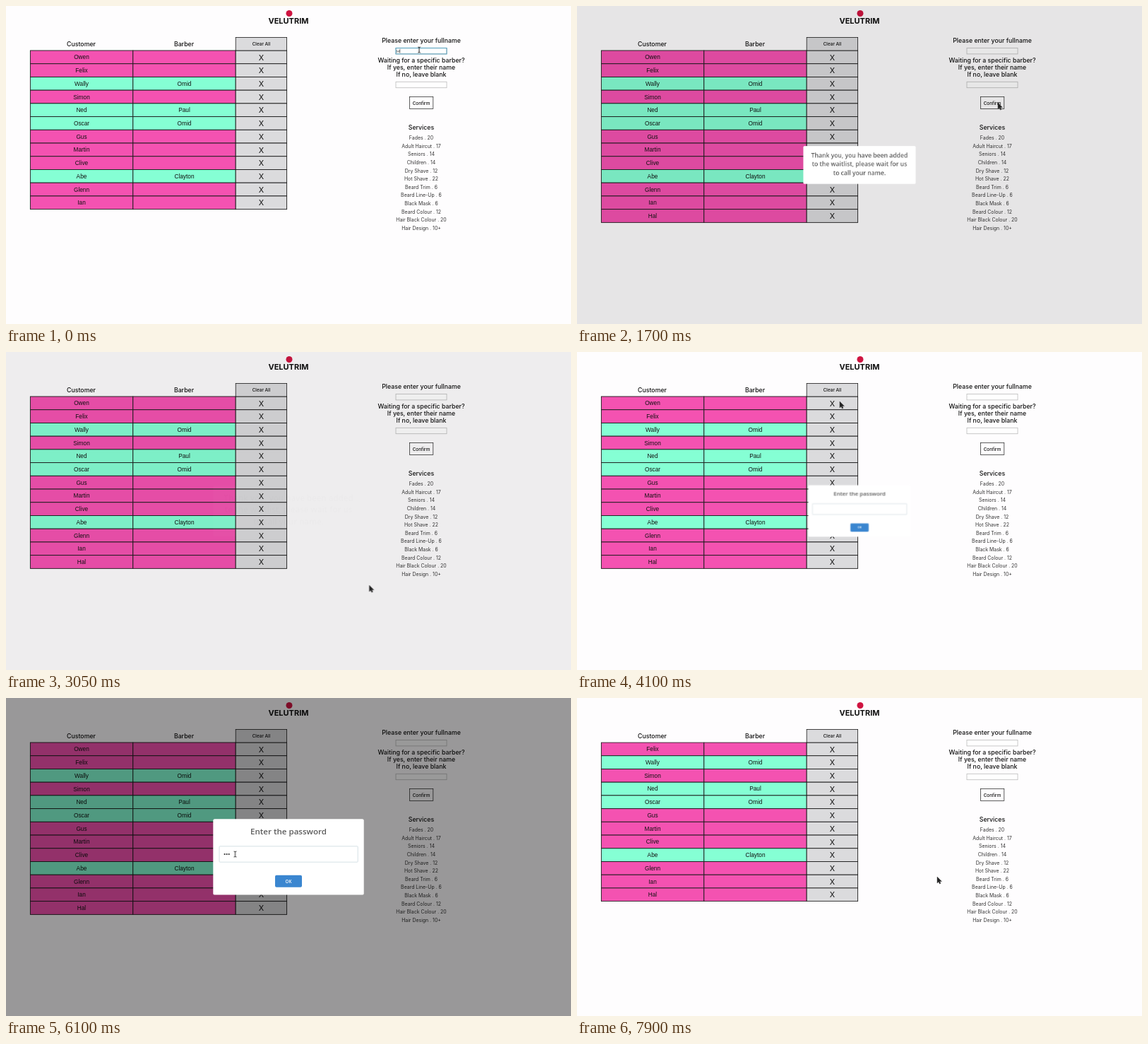
These frames come from a looping animation (800 px wide and 450 px high, 8000 ms). An HTML page:

```html
<!DOCTYPE html>
<html lang="en">
<head>
<meta charset="utf-8">
<title>Barber waitlist</title>
<style>
html, body { margin: 0; width: 100%; height: 100%; overflow: hidden; background: #fefdfe; }
svg { display: block; width: 100%; height: 100%; }
text { font-family: Inter, sans-serif; text-anchor: middle; fill: #111; }
.head { font-size: 8.75px; font-weight: 500; }
.small { font-size: 6.4px; font-weight: 500; }
.list { font-size: 6.95px; fill: #333; }
.name { font: 8.3px "Liberation Sans", Arial, sans-serif; }
.cross { font-size: 10.8px; }
.field { fill: #fff; stroke: #bbb; stroke-width: .8; }
.typed text { font: 6px "Liberation Sans", Arial, sans-serif; text-anchor: start; fill: #333; }
.modal { transform-origin: 400px 225px; }
.modal text { font: 600 11.55px "Open Sans", "Noto Sans", sans-serif; fill: #5c5c5c; }
.modal .ok { font-size: 6.2px; fill: #fff; }

/* 1% = 80 ms */
svg [class*="a-"] { animation: 8s infinite linear; }
svg .a-added { animation-name: added; animation-timing-function: step-end; }
svg .a-removed { animation-name: removed; animation-timing-function: step-end; }
svg .a-shift { animation-name: shift; animation-timing-function: step-end; }
svg .a-type1 { animation-name: type1; animation-timing-function: step-end; }
svg .a-type2 { animation-name: type2; animation-timing-function: step-end; }
svg .a-type3 { animation-name: type3; animation-timing-function: step-end; }
svg .a-focus { animation-name: focus; animation-timing-function: step-end; }
svg .a-dots { animation-name: dots; animation-timing-function: step-end; }
svg .a-hover { animation-name: hover; animation-timing-function: step-end; }
svg .a-beam { animation-name: beam; animation-timing-function: step-end; }
svg .a-arrow { animation-name: arrow; animation-timing-function: step-end; }
svg .a-shade { animation-name: shade; animation-timing-function: ease; }
svg .a-thanks { animation-name: thanks; animation-timing-function: ease; }
svg .a-password { animation-name: password; animation-timing-function: ease; }
svg .a-pointer { animation-name: pointer; animation-timing-function: ease-in-out; }

@keyframes added { 0% { opacity: 0 } 20.6%, 100% { opacity: 1 } }
@keyframes removed { 0% { opacity: 1 } 94.3%, 100% { opacity: 0 } }
@keyframes shift { 0% { transform: none } 94.3%, 100% { transform: translateY(-18.72px) } }
@keyframes type1 { 0% { opacity: 1 } 2.5%, 100% { opacity: 0 } }
@keyframes type2 { 0% { opacity: 0 } 2.5% { opacity: 1 } 5%, 100% { opacity: 0 } }
@keyframes type3 { 0% { opacity: 0 } 5% { opacity: 1 } 20.6%, 100% { opacity: 0 } }
@keyframes focus { 0% { opacity: 1 } 20%, 100% { opacity: 0 } }
@keyframes dots { 0%, 100% { opacity: 0 } 75% { opacity: 1 } }
@keyframes hover { 0% { opacity: 0 } 90.3%, 100% { opacity: 1 } }
@keyframes beam { 0% { opacity: 1 } 14.4% { opacity: 0 } 67.6% { opacity: 1 } 85.2%, 100% { opacity: 0 } }
@keyframes arrow { 0% { opacity: 0 } 14.4% { opacity: 1 } 67.6% { opacity: 0 } 85.2%, 100% { opacity: 1 } }
@keyframes shade {
  0%, 20.62% { opacity: 0 } 24.37%, 36.1% { opacity: .4 } 39.85%, 51.25% { opacity: 0 }
  55%, 93.6% { opacity: .4 } 97.3%, 100% { opacity: 0 }
}
@keyframes thanks {
  0%, 20.8% { opacity: 0; transform: scale(.5) }
  20.81% { opacity: 1; transform: scale(.5) }
  22.5% { transform: scale(1.05) }
  23.81% { transform: scale(.95) }
  24.56% { transform: none }
  36.1% { opacity: 1; transform: none }
  38.6%, 100% { opacity: 0; transform: none }
}
@keyframes password {
  0%, 50.89% { opacity: 0; transform: scale(.5) }
  50.9% { opacity: 1; transform: scale(.5) }
  52.59% { transform: scale(1.05) }
  53.9% { transform: scale(.95) }
  54.65% { transform: none }
  93.6% { opacity: 1; transform: none }
  96.1%, 100% { opacity: 0; transform: none }
}
@keyframes pointer {
  0%, 12.5% { transform: translate(585px, 62px) }
  18.8%, 23.1% { transform: translate(596px, 137px) }
  32.5%, 37.5% { transform: translate(516px, 333px) }
  46%, 53% { transform: translate(372px, 70px) }
  58.7%, 61.2% { transform: translate(484px, 99px) }
  68.7%, 83.1% { transform: translate(324.5px, 221px) }
  90.8%, 93.6% { transform: translate(405px, 257px) }
  98.6%, 100% { transform: translate(510px, 253px) }
}
</style>
</head>
<body>
<svg viewBox="0 0 800 450">
  <rect width="800" height="450" fill="#fefdfe"/>
  <circle cx="401" cy="10.5" r="4.5" fill="#cf1440"/>
  <text x="400" y="24.6" font-size="11" font-weight="700">VELUTRIM</text>

  <g id="table"></g>
  <g id="form"></g>

  <g class="typed">
    <rect class="a-focus" x="552" y="59.5" width="72" height="8.4" fill="none" stroke="#4f9dbb"/>
    <g class="a-type1"><text x="553" y="65.8">H</text><path d="M557.9 60.8v5.8" stroke="#222" stroke-width=".6"/></g>
    <g class="a-type2"><text x="553" y="65.8">Ha</text><path d="M561.2 60.8v5.8" stroke="#222" stroke-width=".6"/></g>
    <g class="a-type3"><text x="553" y="65.8">Hal</text><path d="M562.6 60.8v5.8" stroke="#222" stroke-width=".6"/></g>
  </g>

  <rect class="a-shade" width="800" height="450"/>

  <g class="modal a-thanks">
    <rect x="293.3" y="189" width="213.4" height="72" rx="2.2" fill="#fff"/>
    <text x="400" y="210.6">Thank you, you have been added</text>
    <text x="400" y="227.4">to the waitlist, please wait for us</text>
    <text x="400" y="244.2">to call your name.</text>
  </g>

  <g class="modal a-password">
    <rect x="293.3" y="171.2" width="213.4" height="107.4" rx="2.2" fill="#fff"/>
    <text x="400" y="192.8">Enter the password</text>
    <rect x="302" y="209.8" width="196.2" height="22.4" rx="1" fill="#fff" stroke="#d5e1e5"/>
    <g id="dots" fill="#333"></g>
    <rect x="381" y="250.8" width="38" height="17" rx="2" fill="#3a86d0"/>
    <g class="a-hover">
      <rect x="379.7" y="249.5" width="40.6" height="19.6" rx="2.6" fill="none" stroke="#b5cede" stroke-width="1.2"/>
      <rect x="381" y="250.8" width="38" height="17" rx="2" fill="#2f79bd"/>
    </g>
    <text class="ok" x="400" y="261.5">OK</text>
  </g>

  <g class="a-pointer">
    <path class="a-beam" d="M-1.8-4Q0-4 0-3Q0-4 1.8-4M0-3V3M-1.8 4Q0 4 0 3Q0 4 1.8 4" fill="none" stroke="#222" stroke-width="1"/>
    <path class="a-arrow" d="M0 0V9l2-1.9 1.4 3 1.6-.8-1.4-2.8h2.8z" fill="#222" stroke="#444" stroke-width=".5"/>
  </g>
</svg>
<script>
const ROW = 18.72, TOP = 63;
const PINK = '#f452b1', MINT = '#85ffd4', GREY = '#dbdbdd';

const rect = (x, y, w, h, fill, line = .9) =>
  `<rect x="${x}" y="${y}" width="${w}" height="${h}" fill="${fill}" stroke="#1a1a1a" stroke-width="${line}"/>`;
// y is the middle of the capitals
const label = (x, y, text, cls) => `<text x="${x}" y="${y}" dy=".36em" class="${cls}">${text}</text>`;
const fill = (id, parts) => { document.getElementById(id).innerHTML = parts.join(''); };

const queue = ['Owen', 'Felix', 'Wally:Omid', 'Simon', 'Ned:Paul', 'Oscar:Omid', 'Gus',
  'Martin', 'Clive', 'Abe:Clayton', 'Glenn', 'Ian', 'Hal'];

const rows = queue.map((entry, i) => {
  const [customer, barber = ''] = entry.split(':');
  const y = TOP + i * ROW, mid = y + ROW / 2, color = barber ? MINT : PINK;
  const state = i === 0 ? 'a-removed' : i === queue.length - 1 ? 'a-added' : '';
  return `<g class="${state}">`
    + rect(34.4, y, 145.4, ROW, color) + rect(179.8, y, 145.4, ROW, color) + rect(325.2, y, 72.4, ROW, GREY)
    + label(107, mid, customer, 'name') + label(252.5, mid, barber, 'name') + label(361.5, mid + .3, 'X', 'cross')
    + '</g>';
});

fill('table', [
  rows[0],
  `<g class="a-shift">${rows.slice(1).join('')}</g>`,
  label(106.5, 53.5, 'Customer', 'head'),
  label(252, 53.5, 'Barber', 'head'),
  rect(325.2, 44.4, 72.4, 18.6, GREY, .8),
  label(361.5, 54, 'Clear All', 'small')
]);

const questions = [[49, 'Please enter your fullname'], [77, 'Waiting for a specific barber?'],
  [87, 'If yes, enter their name'], [97, 'If no, leave blank']];
const services = ['Fades . 20', 'Adult Haircut . 17', 'Seniors . 14', 'Children . 14', 'Dry Shave . 12',
  'Hot Shave . 22', 'Beard Trim . 6', 'Beard Line-Up . 6', 'Black Mask . 6', 'Beard Colour . 12',
  'Hair Black Colour . 20', 'Hair Design . 10+'];

fill('form', [
  ...questions.map(([y, text]) => label(588, y, text, 'head')),
  ...[59.5, 107.3].map(y => `<rect class="field" x="552" y="${y}" width="72" height="8.4"/>`),
  rect(571.4, 128.4, 33.4, 17.2, '#fefdfe', .7),
  label(588, 137.3, 'Confirm', 'small'),
  label(588, 171.8, 'Services', 'head'),
  ...services.map((text, i) => label(588, 186.4 + i * 11.65, text, 'list'))
]);

// Each dot starts 40 ms after the one before, shifted back one loop so nothing shows early
fill('dots', Array.from({ length: 8 }, (_, i) =>
  `<circle class="a-dots" cx="${309.6 + i * 3.05}" cy="221" r="1.1" style="animation-delay:${i * 40 - 8000}ms"/>`));
</script>
</body>
</html>
```
